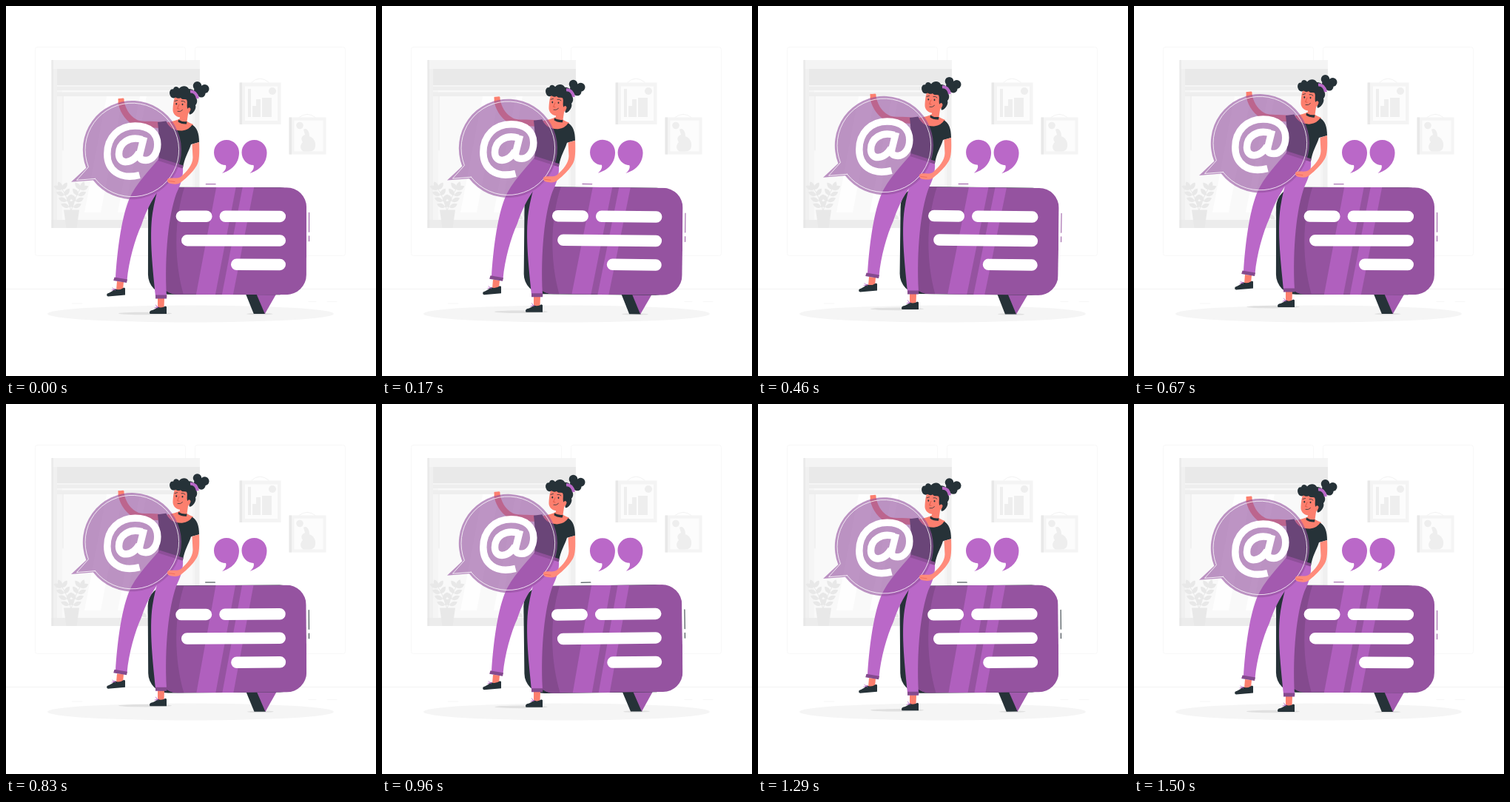
An HTML page that plays this animation: 500 by 500 pixels, repeating every 1540 ms.

```html
<!DOCTYPE html>
<html lang="en">
<head>
<meta charset="utf-8">
<title>Message bubble</title>
<style>
  html, body { margin: 0; width: 100%; height: 100%; overflow: hidden; background: #fff; }
  svg { display: block; width: 100vw; height: 100vh; }
  .line { fill: none; stroke-linecap: round; stroke-linejoin: round; }
  .dark { fill: #263238; }
  .purple { fill: #ba68c8; }
  .deep { fill: #9553a0; }
  .skin { fill: #ff8b7b; }
  .face { fill: #fc7f6e; }
</style>
</head>
<body>
<svg viewBox="0 0 500 500">
  <defs>
    <clipPath id="front"><rect x="205" y="245" width="201" height="145" rx="27"/></clipPath>
    <path id="leaf" d="M0 0C-5 -2 -6 -7 -4 -11C1 -9 3 -4 0 0Z"/>
    <path id="quote" d="M298 181C308 181 315 189 315 198C315 213 305 222 292 226C297 222 298 218 297 215C288 215 281 207 281 198C281 188 289 181 298 181Z"/>
  </defs>

  <!-- room -->
  <g class="line" stroke="#f8f8f8">
    <rect x="39.5" y="55.5" width="203" height="282" rx="3"/>
    <rect x="255.5" y="55.5" width="203" height="282" rx="3"/>
    <path stroke="#f2f2f2" d="M0 382.5H500"/>
    <path stroke="#f7f7f7" d="M89 402H103M409 399.500H419M434 399.500H447"/>
  </g>

  <!-- window -->
  <rect x="61.500" y="73" width="200" height="227" fill="#f0f0f0"/>
  <rect x="69" y="82" width="186" height="207" fill="#f5f5f5"/>
  <rect x="76" y="110" width="176" height="179" fill="#f9f9f9"/>
  <path fill="#fff" d="M136 122H158L128 279H106ZM181 122H190L160 279H151Z" opacity=".8"/>
  <rect x="61.500" y="73" width="200" height="12" fill="#f4f4f4"/>
  <path fill="#e9e9e9" d="M69 85H262V107H69Z"/>
  <path fill="#eee" d="M69 109H262V114H69ZM69 116.500H262V122H69Z"/>
  <path fill="#ececec" d="M61.500 289H262V300H61.500Z"/>
  <path fill="#e4e4e4" d="M61.500 73H64V300H61.500Z" opacity=".6"/>
  <path class="line" stroke="#e9e9e9" d="M77 122V195"/>
  <g fill="#e8e8e8">
    <g id="leaves"></g>
    <path d="M78 275.500H99L95.500 300H81.500Z"/>
  </g>

  <!-- pictures -->
  <g class="line" stroke="#efefef" stroke-width=".8">
    <path d="M332 103Q343 93 355 103M396 150.500Q407 142 418 150.500"/>
  </g>
  <path fill="#f4f4f4" d="M316 103.500H371.500V160H316Z"/>
  <path fill="#e8e8e8" d="M315.500 103.500H319V160H315.500Z"/>
  <path fill="#fcfcfc" d="M323 108.500H367V155H323Z"/>
  <path fill="#eee" d="M327 112H331V150H327ZM333 135H338V126H344V150H333ZM346 124H359V150H346Z"/>
  <circle cx="360" cy="115" r="5" fill="#eee"/>
  <path fill="#f4f4f4" d="M382.500 150.500H432.500V200.500H382.500Z"/>
  <path fill="#e8e8e8" d="M382.500 150.500H386V200.500H382.500Z"/>
  <path fill="#fcfcfc" d="M389.500 154.500H428.500V196.500H389.500Z"/>
  <circle cx="397" cy="161.500" r="4.800" fill="#eee"/>
  <path fill="#eee" d="M402 167C406 164 410 169 410 176C416 178 419 184 418 190Q417 196.500 410 196.500H402C397 194 397 188 401 184C398 180 399 176 404 174Z"/>

  <ellipse cx="249.500" cy="416" rx="193.500" ry="11.500" fill="#f5f5f5"/>

  <!-- message card -->
  <g id="card">
    <ellipse cx="343" cy="416" rx="18" ry="1.200" fill="#e0e0e0"/>
    <path class="dark" d="M324 389H340L350.500 416H335Z"/>
    <path fill="#a259ae" d="M338 388H366L350 416Z"/>
    <rect class="dark" x="192" y="245" width="205" height="145" rx="27"/>
    <g clip-path="url(#front)">
      <path class="deep" d="M205 245H406V390H205Z"/>
      <path fill="#b060be" d="M284 245H310.500L283 390H257ZM319.500 245H335L307 390H292Z"/>
      <path fill="#844a8e" d="M200 245H241C229 282 225 337 240 390H200Z"/>
    </g>
    <g fill="#fff">
      <rect x="229.500" y="276.500" width="49" height="15.500" rx="7.750"/>
      <rect x="288.500" y="276.500" width="89.500" height="15.500" rx="7.750"/>
      <rect x="237" y="309" width="141" height="15.500" rx="7.750"/>
      <rect x="304" y="341.500" width="74" height="15.500" rx="7.750"/>
    </g>
    <path id="ticks" class="line" d="M270 240.800H283M409.500 279V305M409.500 310.500V317.500"/>
  </g>

  <g id="quotes" class="purple">
    <use href="#quote"/>
    <use href="#quote" x="37.500"/>
  </g>

  <!-- woman with bubble -->
  <g id="woman">
    <ellipse cx="188" cy="415.500" rx="36" ry="1.800" fill="#e0e0e0"/>

    <path class="face" d="M150 372L159 373L158 384L149 384ZM205 395H214L213.500 408H205Z"/>
    <path class="dark" d="M147 382Q153 385 159.500 380.500L161 381.500V390.500L138 392.500Q135.500 392 136.500 389C140 387 144 386 147 382ZM205 406.500Q210 409 215.500 405.500L217 406.500V416H194.500Q193 413 196 411.500C200 410.500 203 409 205 406.500Z"/>
    <path class="line" stroke="#ba68c8" stroke-width=".9" d="M143 384L148 382.500M144 381L147.500 384M201 408L206 406.500M202.500 404L205 408"/>

    <path class="purple" d="M206 207C194 222 175 240 166 262C155 290 150 335 148 368L163.500 371C166 344 174 316 183 296C188 280 197 262 206 250L230 213Z"/>
    <path class="purple" d="M206 207L239 218C240 232 235 243 230 254C220 282 214 335 217 392H202C199 360 193 313 198 280C200 266 204 252 207 240Z"/>
    <path fill="#844a8e" d="M146.500 366.500L164 369.500L163 374L145.200 371ZM202 390.500H217.500L217 395.500H202Z"/>

    <path class="line" stroke="#fc8373" stroke-width="8.500" d="M155.800 131C158.500 143 166 153.500 177 158.500C187 162 200 158 212 162"/>
    <path class="face" d="M151.500 126Q151 124.500 153.500 125L158.500 124.500Q160 125 159.500 127L160 134H152Z"/>

    <path class="face" d="M235 146H246L244.500 156Q249 158.500 253 160L246 172Q225 174 213 158Q230 155.500 235 152Z"/>
    <path class="dark" d="M205 157L216.500 155.500C220 165 229 169 238 168.500Q248 167 251.500 160.500C258 164 261 172 261 184L250 187C247 197 241 205 239 219L206 208C208 195 207 174 205 157Z"/>
    <path fill="#844a8e" d="M206.500 205L239.500 215.500L238.500 219.500L205.500 209Z"/>
    <path class="dark" d="M233 153.500Q238 157 244.500 156L244 159.500Q237 160 232.500 156.500Z"/>

    <!-- head -->
    <path class="face" d="M228 123C226 130 226 133 225.500 139C225 145 229 149.500 235 150.500C242 151 246 147 247 144C253 145 254 138 250 136L246 122Z"/>
    <g class="dark">
      <path d="M221.500 120C220 115 223 111.500 226 112.500C227 108 232 108 234 111.500C238 106.500 245 107.500 247 112C254 112 259 118 257.500 125C259 129 258 132 256 134C258 139 252 147 248 146.500C246 144 251 141 249 138C247 136 246 138 245.500 139C243.500 135 246 130 244 126.500C241 126 238 127 236 124C233 126 230 124 229 123.500C226 125.500 222.500 124 221.500 120Z"/>
      <circle cx="258.500" cy="107.800" r="5.800"/>
      <circle cx="268.500" cy="112" r="6"/>
      <circle cx="264" cy="118" r="5.500"/>
      <circle cx="260" cy="114" r="6"/>
      <ellipse cx="230.300" cy="132.300" rx=".9" ry="1.300"/>
      <ellipse cx="238.500" cy="133" rx=".9" ry="1.300"/>
    </g>
    <path class="line" stroke="#ba68c8" stroke-width="4" style="stroke-linecap:butt" d="M249 115.500Q257 115 259 125"/>
    <g class="line" stroke="#263238" stroke-width=".8">
      <path d="M228 128.500L231.500 127.500M237 128.500Q240 127.500 242 130M232 142.500Q236 143.500 238.500 140.500"/>
      <path stroke="#d9523f" d="M234 133L231.500 138.500L234 139"/>
    </g>

    <!-- see-through bubble -->
    <path class="deep" opacity=".61" d="M117.800 235.400L88 237.800L108.350 218.750A66.600 66.600 0 1 1 117.800 235.400Z"/>
    <path class="line" stroke="#fff" stroke-width=".8" d="M120.400 233.400L95.500 235.400L111.400 217.600A63.300 63.300 0 1 1 120.400 233.400Z"/>
    <g class="line" stroke="#fff" stroke-width="9.500" style="stroke-linecap:butt">
      <path d="M180.500 228.500C153 235.500 136.800 221 136.800 200C136.800 177 153 162 174.500 162C194 162 204.800 172 204.800 187C204.800 200 197 208.500 189 208.500C181.500 208.500 179.500 205 181 199L186.500 177"/>
      <path d="M184 180.500C167 175.500 152.500 185 152.500 200C152.500 214.500 170 214.500 180 198"/>
    </g>

    <path class="skin" d="M251.500 186.800L261 184C261.500 198 261.500 210 257.500 216C252 225 244 232 238 237C233 242 226 241 221 239.500C217.500 238.500 217 234 219.500 233C225 231.500 231 234 236 231C245 223 252 215 252.500 205Z"/>
    <path class="line" stroke="#e8604e" stroke-width=".7" d="M220 236.500L228 237.500"/>
  </g>
</svg>
<script>
  const LOOP = 1540, FPS = 24, STEPS = 36, LEAD = 40 / 1500;
  const el = id => document.getElementById(id);
  const [card, quotes, woman, ticks, leaves] =
    ['card', 'quotes', 'woman', 'ticks', 'leaves'].map(el);

  // Two curved stems with leaf pairs
  const addLeaf = (x, y, turn) =>
    `<use href="#leaf" transform="translate(${x} ${y}) rotate(${turn})"/>`;
  const stem = side => {
    let out = `<path d="M88 277Q${88 + side * 5} 258 ${88 + side * 13} 246" class="line" stroke="#e8e8e8"/>`;
    for (let i = 0; i < 4; i++) {
      const x = 88 + side * (3 + i * 3.2), y = 272 - i * 8;
      out += addLeaf(x, y, 20 + side * 68) + addLeaf(x, y, 20 - side * 38);
    }
    return out + addLeaf(88 + side * 13, 248, 20 + side * 22);
  };
  leaves.innerHTML = stem(-1) + stem(1) + addLeaf(190, 288, -35) + addLeaf(194, 287, 15);

  const sway = p => p < .25 ? 4 * p : p < .75 ? 2 - 4 * p : 4 * p - 4;
  const lift = p => 10 * (1 - Math.abs(2 * p - 1));

  function pose(ms) {
    const step = Math.floor((ms % LOOP + 4) * FPS / 1000);
    const p = (step / STEPS + LEAD) % 1, turn = sway(p);
    card.setAttribute('transform', `rotate(${turn} 301 328)`);
    quotes.setAttribute('transform', `rotate(${turn} 316.5 203.5)`);
    woman.setAttribute('transform', `translate(0 ${lift(LEAD) - lift(p)})`);
    ticks.setAttribute('stroke', turn < 0 ? '#263238' : '#9553a0');
  }

  const start = performance.now();
  function tick() {
    pose(performance.now() - start);
    requestAnimationFrame(tick);
  }
  tick();
</script>
</body>
</html>
```
